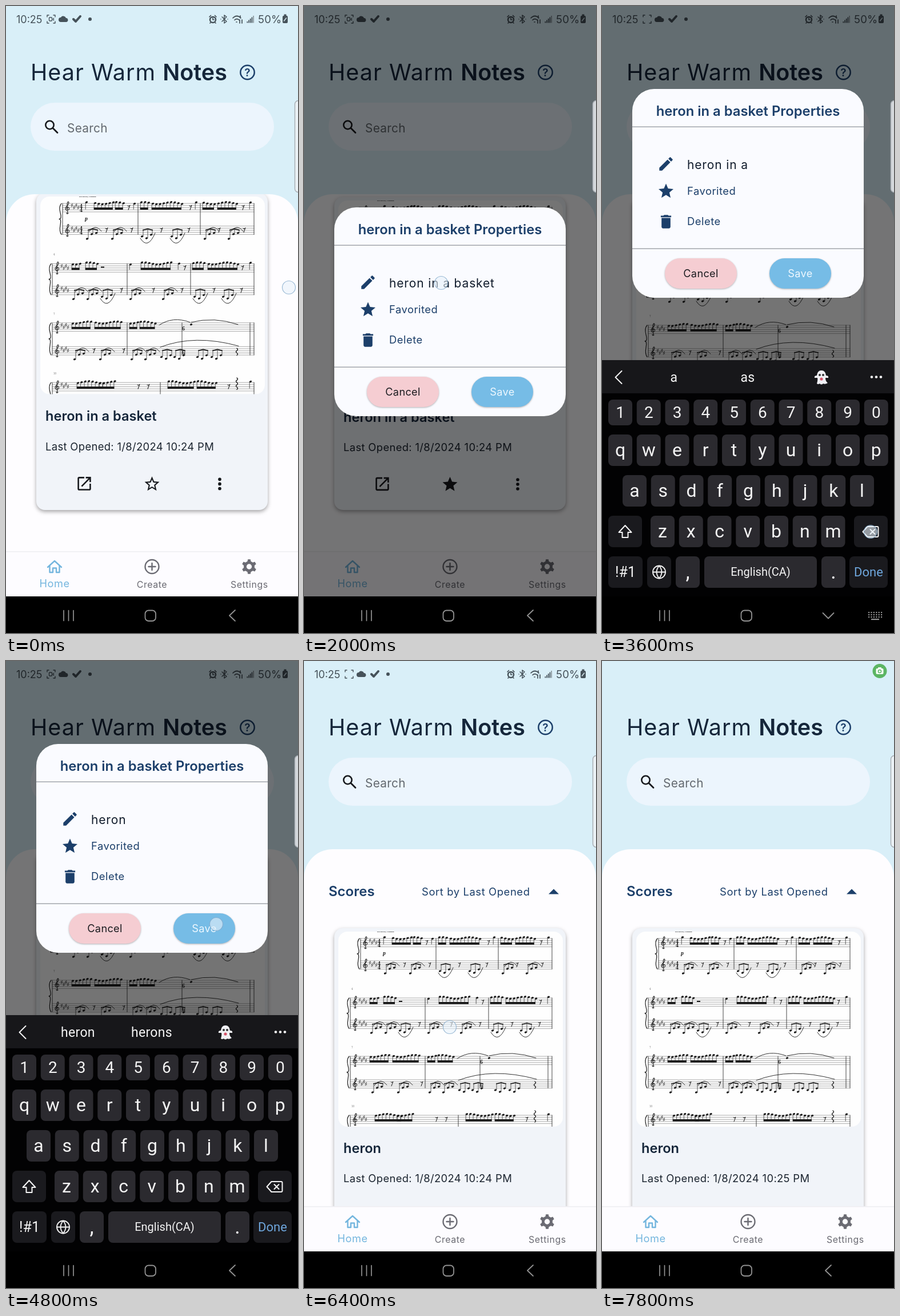
Write an HTML page with a canvas that moves like this. It is 511 by 1096 pixels and loops after 8000 ms.

```html
<!DOCTYPE html>
<html lang="en">
<head>
<meta charset="utf-8">
<title>Score app</title>
<style>
html, body { margin: 0; width: 100%; height: 100%; overflow: hidden; background: #000; }
canvas { display: block; width: 100vw; height: 100vh; }
</style>
</head>
<body>
<canvas id="stage" width="511" height="1096"></canvas>
<script>
const c = document.getElementById('stage').getContext('2d');
const W = 511, STEP = 200, LOOP = 8000;
const SKY = '#d9eff8', NAVY = '#1c3f6a', INK = '#15263a', PAPER = '#fefdff', CARD = '#f1f4f9', BLUE = '#74b6de', GREY = '#6b6b73';
const SCORE_NAME = 'heron in a basket', SHORT_NAME = 'heron';

const GLYPHS = {
  star: 'M12 17.27L18.18 21l-1.64-7.03L22 9.24l-7.19-.61L12 2 9.19 8.63 2 9.24l5.46 4.73L5.82 21z',
  starOutline: 'M22 9.24l-7.19-.62L12 2 9.19 8.63 2 9.24l5.46 4.73L5.82 21 12 17.27 18.18 21l-1.63-7.03zM12 15.4l-3.76 2.27 1-4.28-3.32-2.88 4.38-.38L12 6.1l1.71 4.04 4.38.38-3.32 2.88 1 4.28z',
  edit: 'M3 17.25V21h3.75L17.81 9.94l-3.75-3.75zM20.71 7.04c.39-.39.39-1.02 0-1.41l-2.34-2.34c-.39-.39-1.02-.39-1.41 0l-1.83 1.83 3.75 3.75z',
  bin: 'M6 19c0 1.1.9 2 2 2h8c1.1 0 2-.9 2-2V7H6zM19 4h-3.5l-1-1h-5l-1 1H5v2h14z',
  open: 'M19 19H5V5h7V3H5c-1.11 0-2 .9-2 2v14c0 1.1.89 2 2 2h14c1.1 0 2-.9 2-2v-7h-2zM14 3v2h3.59l-9.83 9.83 1.41 1.41L19 6.41V10h2V3z'
};

// ---- drawing helpers ----
function at(x, y, draw, sx = 1, sy = sx) {
  c.save(); c.translate(x, y); c.scale(sx, sy); draw(); c.restore();
}
function box(x, y, w, h, r, fill, stroke, lw = 1) {
  c.beginPath(); c.roundRect(x, y, w, h, r);
  if (fill) { c.fillStyle = fill; c.fill(); }
  if (stroke) { c.strokeStyle = stroke; c.lineWidth = lw; c.stroke(); }
}
function dot(x, y, r, fill, stroke, lw) { box(x - r, y - r, 2 * r, 2 * r, r, fill, stroke, lw); }
function shadowed(blur, dy, alpha, draw) {
  c.save();
  c.shadowColor = `rgba(0,0,0,${alpha})`; c.shadowBlur = blur; c.shadowOffsetY = dy;
  draw(); c.restore();
}
function clipped(x, y, w, h, r, draw) {
  c.save(); c.beginPath(); c.roundRect(x, y, w, h, r); c.clip(); draw(); c.restore();
}
function text(s, x, y, size, color, { weight = 400, ls = 0, align = 'left', font = 'Inter' } = {}) {
  c.font = `${weight} ${size}px "${font}", sans-serif`;
  c.letterSpacing = ls + 'px'; c.textAlign = align; c.fillStyle = color;
  c.fillText(s, x, y);
  return c.measureText(s).width;
}
function line(d, x, y, color, lw = 2) {
  at(x, y, () => {
    c.strokeStyle = color; c.lineWidth = lw; c.lineJoin = c.lineCap = 'round';
    c.stroke(new Path2D(d));
  });
}
function shape(d, x, y, color) {
  at(x, y, () => { c.fillStyle = color; c.fill(new Path2D(d)); });
}
function icon(name, x, y, color, s = 1.3) {
  at(x, y, () => shape(GLYPHS[name], -12, -12, color), s);
}
function gear(x, y, r, color, outline) {
  c.beginPath();
  for (let i = 0; i < 24; i++) {
    const a = (Math.floor(i / 4) + [-.3, -.17, .17, .3][i % 4]) * Math.PI / 3 + Math.PI / 6;
    const d = i % 4 % 3 ? r : r * .74;
    c.lineTo(x + d * Math.cos(a), y + d * Math.sin(a));
  }
  c.closePath();
  if (outline) {
    c.strokeStyle = color; c.lineWidth = 2; c.stroke();
    dot(x, y, r * .3, null, color, 2);
  } else {
    c.moveTo(x + r * .36, y); c.arc(x, y, r * .36, 0, 7);
    c.fillStyle = color; c.fill('evenodd');
  }
}

// ---- sheet music; "x:n" is a beamed run, "xa"/"xu"/"xb" a group with an arch, a bowl or no slur ----
const SYSTEMS = [
  { t: 12, b: 51, x: 39, bars: [171, 280], treble: '81:1 96:6 133:3 165:1 177:3 197:9 273:1 286:4 312:6 368:1',
    bass: '82a 126a 178u 230u 288a 330a', rests: [153, 261, 353], low: [114, 158, 210, 258, 311, 355] },
  { t: 116, b: 155, x: 21, bars: [152, 263], treble: '57:3 81:4 158:1 178:9 243:1 268:4 295:9 368:1',
    bass: '58a 83a 108u 158a 215a 270u 320u', rests: [251, 352], low: [140, 196, 246, 302, 350] },
  { t: 218, b: 259, x: 21, bars: [152, 248, 367], treble: '57:6 97:8 158:3 176:5',
    bass: '60a 105a 160a 184a 212b 235b 275b 300b', rests: [], low: [92, 144] },
  { t: 321, b: 361, x: 21, bars: [210], treble: '66:8 105:5 225:8 276:6 368:1',
    bass: '66a 110u 160a 225a 270u 320a', rests: [170, 187, 328], low: [143, 200, 302] }
];
const BLACK = '#1b1b1b';
function head(x, y) {
  c.fillStyle = BLACK; c.beginPath(); c.ellipse(x, y, 2.2, 1.6, -.3, 0, 7); c.fill();
}
function run(x, n, top) {
  for (let i = 0; i < n; i++) {
    const px = x + i * 6.4, y = top - .5 + Math.sin(px * .13) * 1.8;
    head(px, y);
    line(`M0 0V${top + 10 - y}`, px - 1.8, y, BLACK, .7);
  }
  if (n > 1) { c.fillStyle = BLACK; c.fillRect(x - 2.2, top + 7, (n - 1) * 6.4 + 1, 3.8); }
}
function figure(x, kind, base) {
  const ys = kind === 'a' ? [22, 14, 12] : [18, 21, 15];
  ys.forEach((y, i) => {
    head(x + i * 8, base + y);
    line(`M0 0V${6 - y}`, x + i * 8 + 2, base + y, BLACK, .7);
  });
  line('M0 0L8-2 16 0', x + 2, base + 7, BLACK, 1.8);
  if (kind === 'a') line('M3 7Q14-8 25 6', x, base + 3, BLACK, .9);
  if (kind === 'u') line('M-3 21Q10 42 23 12', x, base, BLACK, .9);
}
function clef(x, y) {
  line('M1 17q-3 2-3-1M0 17L-1 1q1-6 3-3q0 4-4 7q-4 4 0 7q6 0 4-5q-4-2-4 2', x, y, BLACK, 1.1);
}
function sheetMusic() {
  text(SCORE_NAME, 196, -62, 17, BLACK, { align: 'center', font: 'Noto Serif' });
  text('Lento, calm', 68, 1, 5, BLACK, { weight: 'bold', font: 'Noto Serif' });
  SYSTEMS.forEach((s, k) => {
    const { t, b, x } = s;
    if (k) text(3 * k + 1, x + 2, t - 14, 4.5, '#777', { font: 'Noto Serif' });
    for (const top of [t, b]) {
      for (let i = 0; i < 5; i++) line(`M${x} 0H374`, 0, top + i * 3.65, '#666', .55);
      clef(x + 9, top);
      for (let i = 0; i < 4; i++) text('♯', x + 14 + i * 3.7, top + 7 + i % 2 * 4, 10, BLACK, { weight: 'bold', font: 'DejaVu Sans' });
      if (!k) text('4', x + 30, top + 7.5, 9, BLACK, { weight: 'bold', font: 'Noto Serif' }), text('4', x + 30, top + 14.5, 9, BLACK, { weight: 'bold', font: 'Noto Serif' });
    }
    const h = b + 14.6 - t;
    line(`M0 0V${h}`, x, t, BLACK, .8);
    line(`M0 0q-5 ${h * .1}-2 ${h * .3}t-2 ${h * .2}q4 0 2 ${h * .2}t2 ${h * .3}`, x - 2, t, BLACK, 1.2);
    for (const bar of [...s.bars, 374]) line(`M0 0V${h}`, bar, t, BLACK, .8);
    s.treble.split(' ').forEach(g => run(...g.split(':').map(Number), t));
    s.bass.split(' ').forEach(g => figure(parseInt(g), g.at(-1), b));
    s.rests.forEach(r => line('M0 0q2 2 4-1l-3 8', r, t + 4, BLACK, 1));
    s.low.forEach(r => line('M0 0q2 2 4-1l-3 8', r, b + 4, BLACK, 1));
  });
  text('p', 78, 41, 8, BLACK, { weight: 'italic bold', font: 'Noto Serif' });
  c.fillStyle = BLACK; c.fillRect(106, 121, 6, 2);
  line('M208 222Q232 206 262 217M264 217Q305 207 346 221M210 260Q270 237 347 258', 0, 0, BLACK, .9);
  head(264, 221);
  for (const y of [222, 263]) text('6', 248, y + 9, 9, BLACK, { weight: 'bold', font: 'Noto Serif' });
  line('M0 0q3 2 0 4t0 4t0 4t0 4t0 4', 344, 313, BLACK, 1.4);
  line('M0 0q3 2 0 4t0 4t0 4', 344, 262, BLACK, 1.4);
}

// ---- system parts ----
function statusBar(k) {
  const col = '#46525a';
  text('10:25', 18, 30, 18, col);
  line('M-7-4v-3h3M4-7h3v3M7 4v3h-3M-4 7h-3v-3', 79, 23, col, 1.4);
  if (![2, 3].includes(k % 5)) { box(75.5, 20, 5, 6, 1, null, col, 1.3); line('M0 0l2-2v4z', 81.5, 23, col, 1); }
  shape('M-5 5a4 4 0 0 1 0-8a5 5 0 0 1 9 1a3.6 3.6 0 0 1 1 7z', 101, 23, col);
  line('M-6 1l4 4l8-9', 124, 22, col, 4);
  dot(147, 23, 3, col);
  dot(362, 24, 5, null, col, 2.4); line('M-6-4l2.5-2.5M6-4l-2.5-2.5M0-2v3h2M-4 6l-1 1M4 6l1 1', 362, 23, col, 1.7);
  line('M-4-4l8 8l-4 3v-14l4 3l-8 8M-6 0h0M6 0h0', 382, 23, col, 1.5);
  line('M-8-2q7-7 14 0M-5 1.5q4-4 8 0M-2 5h1M5-6v4M4 7v-6M8 1v6', 405, 23, col, 1.7);
  for (let i = 0; i < 5; i++) box(421.5 + i * 2.7, 27 - i * 2.5, 1.7, 2.5 + i * 2.5, 0, i < 4 ? col : '#8b979d');
  text('50%', 441, 30, 18.5, col, { ls: .2 });
  box(484, 17, 9, 13, 2, col); box(486.5, 14.5, 4, 3, 0, col);
  line('M-2 3l4-5', 488.5, 23, '#cfe0e8', 1.6);
}
function cameraBadge() {
  dot(486, 17.5, 12.5, '#5cb563');
  box(479.5, 13, 13, 10, 2, '#fff'); box(483, 11, 6, 3, 1, '#fff');
  dot(486, 18, 2.6, null, '#5cb563', 1.5);
}
function systemNav(keyboard) {
  c.fillStyle = '#000'; c.fillRect(0, 1032, W, 64);
  const col = '#929292';
  line('M-8.5-9v18M0-9v18M8.5-9v18', 109.5, 1065.5, col, 1.7);
  box(243.5, 1056.5, 18.5, 18.5, 6, null, col, 1.8);
  line(keyboard ? 'M-9.5-4.5L0 5 9.5-4.5' : 'M5-9.5L-5 0 5 9.5', 396, 1065.5, col, 1.8);
  if (keyboard) {
    for (let i = 0; i < 18; i++) box(466 + i % 6 * 4.4, 1059 + Math.floor(i / 6) * 4, 2.2, 2.2, 0, col);
    box(471, 1071, 14, 2.2, 0, col);
  }
}
function edgeHandle() { box(505.5, 165.5, 20, 160, 6, 'rgba(240,243,247,.8)', '#a9aeb4', 1.5); }
function touch(x, y) { dot(x, y, 11.5, 'rgba(232,241,250,.6)', 'rgba(125,165,200,.75)', 1.2); }

function tabs(active, ripple) {
  c.fillStyle = '#fdfcff'; c.fillRect(0, 954, W, 78);
  if (ripple) clipped(0, 954, W, 78, 0, () => {
    const g = c.createLinearGradient(W - 430 * ripple - 80, 0, W, 0);
    g.addColorStop(0, 'rgba(232,232,234,0)'); g.addColorStop(.55, '#ececee'); g.addColorStop(1, '#e9e9eb');
    c.fillStyle = g; c.fillRect(0, 954, W, 78);
  });
  c.fillStyle = '#eeeef2'; c.fillRect(0, 953, W, 1.5);
  const col = i => i === active ? BLUE : GREY;
  line('M-12 1L0-10 12 1M-8.5-2V10H-3V2.5H3V10H8.5V-2', 85, 980, col(0), 2.4);
  dot(255.5, 980, 12, null, col(1), 2.4); line('M-6 0h12M0-6v12', 255.5, 980, col(1), 2.4);
  gear(425.5, 980, 13, col(2));
  ['Home', 'Create', 'Settings'].forEach((s, i) => {
    const on = i === active;
    text(s, 85 + i * 170.4, on ? 1016 : 1017, on ? 18.2 : 15.9, col(i), { align: 'center', ls: .55 });
  });
}

// ---- screens ----
function card(name, starred, minute) {
  shadowed(7, 3, .35, () => box(53, 334, 405, 547, 15, CARD));
  clipped(60, 340, 393, 341, 16, () => {
    c.fillStyle = '#fefefe'; c.fillRect(60, 340, 393, 341);
    at(60, 340, sheetMusic);
  });
  text(name, 69, 727, 23.6, INK, { weight: 600 });
  text(`Last Opened: 1/8/2024 10:${minute} PM`, 69, 778, 18.4, '#1c2530', { ls: .35 });
  icon('open', 137, 835.5, '#17191d');
  icon(starred ? 'star' : 'starOutline', 255.5, 836, '#17191d');
  for (const dy of [-8, 0, 8]) dot(374, 836 + dy, 2.8, '#17191d');
}
function home(k) {
  const atTop = k >= 31, stretch = [1.013, 1.005][k] || 1;
  c.fillStyle = SKY; c.fillRect(0, 0, W, 1032);
  const w = text('Hear Warm ', 43, 130, 39.5, INK, { ls: 1 });
  text('Notes', 43 + w, 130, 39.5, INK, { weight: 600 });
  dot(422.5, 116, 12.2, null, NAVY, 2.5);
  text('?', 422.5, 123, 19, NAVY, { weight: 600, align: 'center' });
  box(43, 169, 426, 84, 42, '#ecf5fd');
  dot(76.5, 208, 7.2, null, '#17191d', 2.6); line('M0 0l8 8', 82, 213.5, '#17191d', 2.8);
  text('Search', 107, 221, 20.8, '#62686e', { ls: .3 });
  clipped(0, 329, W, 703, [50, 50, 0, 0], () => {
    c.fillStyle = PAPER; c.fillRect(0, 329, W, 703);
    if (atTop) {
      text('Scores', 43, 411, 24, NAVY, { weight: 600 });
      text('Sort by Last Opened', 206, 410, 18.4, NAVY, { ls: .6 });
      shape('M-9 4.5L0-4.5 9 4.5z', 437, 403, NAVY);
    }
    at(0, 881 + (atTop ? 133 : 0), () => at(0, -881, () =>
      card(k >= 25 ? SHORT_NAME : SCORE_NAME, k >= 4, k >= 38 ? 25 : 24)), 1, stretch);
  });
  tabs(0);
}
function settings(k) {
  c.fillStyle = PAPER; c.fillRect(0, 0, W, 1032);
  c.fillStyle = SKY; c.fillRect(0, 0, W, 110);
  text('Settings', 22, 85, 31, NAVY, { weight: 600 });
  ['Swipe Action', 'Invert Direction', 'Sensitivity'].forEach((s, i) =>
    text(s, 43, [196, 286, 371][i], 23.4, INK, { ls: .6 }));
  box(380.5, 154.5, 86, 67.5, 6, PAPER, SKY, 4);
  text('Tilt', 394, 197, 23.4, INK, { ls: .4 });
  box(395, 258, 67, 40, 20, '#f1f5fa', NAVY, 3);
  dot(415, 278, 11, NAVY);
  box(244, 360, 193, 5.5, 3, '#f0f2f6'); box(244, 359, 116, 7.5, 3, SKY);
  for (let i = 0; i < 11; i++) dot(248 + i * 18.6, 362.7, 1.4, '#8d9aa5');
  shadowed(3, 1.5, .3, () => dot(360, 363, 13.5, SKY));
  tabs(2, [.45, 1][k - 27] || 0);
}
function reader(loaded) {
  c.fillStyle = PAPER; c.fillRect(0, 0, W, 1032);
  if (loaded) at(0, 249, sheetMusic, W / 393);
  c.fillStyle = '#d4d4d8'; c.fillRect(0, 832.5, W, 5);
  c.fillStyle = '#f0f6fa'; c.fillRect(0, 0, W, 110);
  line('M10 0H-9M0-9.5L-9.5 0 0 9.5', 37, 73, INK, 2.6);
  text(SHORT_NAME, 97, 83, 28.6, INK, { ls: .6 });
  gear(479, 73, 13.5, INK);
  shadowed(4, 1.5, .4, () => box(468, 122, 60, 43, 21.5, '#fafafc'));
  text('1', 490, 149, 17, '#222', { align: 'center' });
}

function dialog(dy, value, handle) {
  at(0, dy, () => {
    box(53, 145, 405, 365, 38, '#fafbff');
    text(SCORE_NAME + ' Properties', 255.5, 192, 23.8, NAVY, { weight: 600, align: 'center' });
    c.fillStyle = '#a3a6ab'; c.fillRect(53, 210.5, 405, 1.5); c.fillRect(53, 423.5, 405, 1.5);
    icon('edit', 112, 276, NAVY); icon('star', 112, 323.5, NAVY); icon('bin', 112, 377, NAVY);
    text(value, 149, 285, 21, '#111c2c', { ls: .85 });
    text('Favorited', 149, 330, 18.4, NAVY, { ls: .5 });
    text('Delete', 149, 383, 18.4, NAVY, { ls: .5 });
    if (handle) shape('M0-20L10-10A14 14 0 1 1-10-10z', 328, 312, '#d5edf8');
    shadowed(3, 1, .3, () => { box(110, 441, 126, 53, 26.5, '#f5cdd2'); box(293, 441, 108, 53, 26.5, '#76bce6'); });
    text('Cancel', 173, 473.5, 18.2, '#1c1c20', { align: 'center', ls: .3 });
    text('Save', 347, 473.5, 18.2, '#eef8ff', { align: 'center', ls: .3 });
  });
}

function key(x, y, w, h, label, size = 31, fill = '#2b2a2f', color = '#f4f4f4') {
  box(x, y, w, h, 8, fill);
  text(label, x + w / 2, y + h / 2 + size * .33, size, color, { align: 'center', font: 'Roboto' });
}
function keyboard(dy, word) {
  const DARK = '#1a1a1e', WHITE = '#f4f4f4';
  at(0, dy, () => {
    c.fillStyle = '#020203'; c.fillRect(0, 619, W, 480);
    c.fillStyle = '#17171a'; c.fillRect(0, 619, W, 58);
    if (word) {
      line('M5.5-11L-5.5 0 5.5 11', 29, 649, WHITE, 2);
      text(word, 126, 657, 23, WHITE, { align: 'center', font: 'Roboto', ls: .3 });
      text(word + 's', 255, 657, 23, WHITE, { align: 'center', font: 'Roboto', ls: .3 });
      shape('M-8 11Q-6 4-7 1L-12 1Q-13-3-8-3Q-7-12 0-12Q7-12 8-3Q13-3 12 1L7 1Q7 7 11 10Q6 13 3 11Q0 14-3 11Q-6 13-8 11z', 384, 649, '#f0f0f4');
      dot(381, 645, 2, '#333'); dot(387, 645, 2, '#333'); dot(384, 652, 2.6, '#d6546a');
    } else {
      for (const x of [45, 135, 224.5, 314.5, 404]) dot(x, 648, 21.5, '#2b2b30');
      dot(45, 648, 10.5, null, WHITE, 2); line('M-5 2q5 7 10 0zM-4-3h0M4-3h0', 45, 648, WHITE, 2);
      box(126, 638, 18, 20, 4, null, WHITE, 2); line('M-4-3h0M0-3h0M4-3h0M-4 1h0M0 1h0M4 1h0M-2 5h4', 135, 647, WHITE, 2);
      box(215.5, 639, 18, 19, 4, null, WHITE, 2); box(220, 638, 9, 5, 1, null, WHITE, 2);
      box(310.5, 637, 8, 14, 4, null, WHITE, 2); line('M-8-1a8 8 0 0 0 16 0M0 7v4', 314.5, 648, WHITE, 2);
      gear(404, 648, 11, WHITE, true);
      dot(497, 632, 4.5, '#8d8d91');
    }
    for (const x of [472, 480, 488]) dot(x, 648.5, 2.3, WHITE);
    [['1234567890', 11, 688, 45], ['qwertyuiop', 11, 749, 55], ['asdfghjkl', 36, 820, 55], ['zxcvbnm', 85, 891, 55]]
      .forEach(([chars, x, y, h], r) => [...chars].forEach((ch, i) => key(x + i * 49.75, y, 42, h, ch, r ? 32 : 28)));
    box(11, 891, 59, 55, 8, DARK); line('M0-11L11 1H5V10H-5V1H-11z', 40.5, 919, WHITE, 2);
    box(441, 891, 59, 55, 8, DARK); line('M-14 0L-6-9H11Q13-9 13-7V7Q13 9 11 9H-6zM-1-4l8 8M7-4l-8 8', 470.5, 919, WHITE, 2);
    key(11, 962, 60, 55, '!#1', 25, DARK);
    box(79, 962, 42, 55, 8, DARK);
    dot(100, 989.5, 11, null, WHITE, 1.8); line('M-11 0h22M0-11q-9 11 0 22q9-11 0-22', 100, 989.5, WHITE, 1.8);
    key(129, 962, 42, 55, ',', 36);
    key(179, 962, 197, 55, 'English(CA)', 20);
    key(384, 962, 42, 55, '.', 36);
    key(433, 962, 67, 55, 'Done', 22, DARK, '#6ea6dc');
  });
}

// ---- timeline ----
const TOUCHES = {
  0: [495, 492], 3: [256, 836], 4: [256, 836], 6: [374, 837], 9: [240, 484], 10: [240, 484],
  23: [368, 460], 24: [368, 460], 26: [426, 990], 30: [85, 990], 32: [255, 640], 37: [37, 73]
};
for (let k = 14; k < 22; k++) TOUCHES[k] = [470, 919];
const TYPING_OFFSET = { 7: 207, 8: 207, 9: 207, 10: 207, 11: 110 };

function draw(k) {
  c.clearRect(0, 0, W, 1096);
  const inSettings = k >= 27 && k <= 30, inReader = k >= 33 && k <= 37;
  const hasDialog = k >= 7 && k <= 25, hasKeyboard = k >= 11 && k <= 24;
  if (inSettings) settings(k);
  else if (inReader && k > 33) reader(k > 34);
  else home(k);
  if (k === 33) { c.globalAlpha = .6; reader(false); c.globalAlpha = 1; }
  if (k === 39) cameraBadge(); else statusBar(k);

  if (hasDialog) {
    c.globalAlpha = { 7: .5, 25: .3 }[k] || 1;
    c.fillStyle = 'rgba(0,0,0,.54)'; c.fillRect(0, 0, W, 1032);
    const left = Math.max(5, Math.min(17, Math.round(17 - (k - 14) * 1.55)));
    const value = SCORE_NAME.slice(0, left);
    dialog(TYPING_OFFSET[k] || 0, value, k === 12 || k === 13);
    c.globalAlpha = 1;
    if (hasKeyboard) keyboard(k === 11 ? 210 : 0, k > 14 ? value.trim().split(' ').pop() : '');
  }
  systemNav(hasKeyboard && k < 24);
  edgeHandle();
  if (TOUCHES[k]) touch(...TOUCHES[k]);
}
function frame() {
  draw(Math.floor(performance.now() % LOOP / STEP));
  requestAnimationFrame(frame);
}
frame();
</script>
</body>
</html>
```
